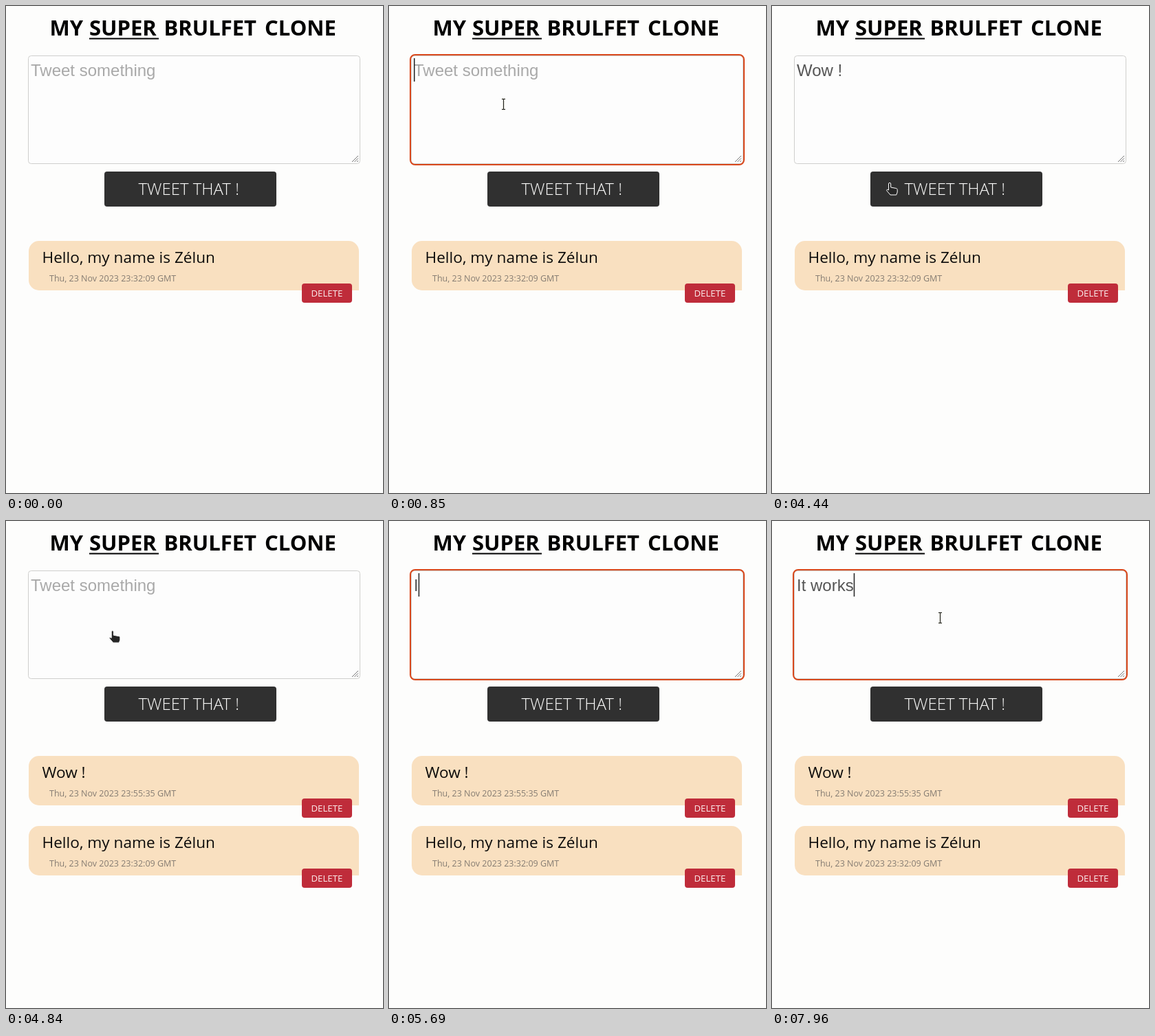
Animation, 548 px wide and 709 px high, one loop 7990 ms. Source, as an HTML page:

```html
<!DOCTYPE html>
<html lang="en">
<head>
<meta charset="utf-8">
<title>Message board</title>
<style>
  html, body { margin: 0; width: 100%; height: 100%; overflow: hidden; background: #fdfdfc; }
  svg { display: block; width: 100vw; height: 100vh; }
  text { font-family: "Open Sans", "Noto Sans", sans-serif; white-space: pre; }
  .title { font-size: 31px; font-weight: 700; }
  .post { font-size: 22.6px; fill: #0c0b0a; }
  .date { font-size: 12.5px; fill: #857c72; }
  .delete { font-size: 13.2px; fill: #fbeeee; }
  .send { font-size: 24px; font-weight: 300; fill: #fdfdfc; }
  .field { font: 24px "Liberation Sans", Arial, sans-serif; }
</style>
</head>
<body>
<svg viewBox="0 0 548 709">
  <defs>
    <g id="deleteButton">
      <rect x="430" y="404" width="73" height="28" rx="4" fill="#bf2c3a"/>
      <text class="delete" x="443.5" y="423">DELETE</text>
    </g>
  </defs>
  <rect width="548" height="709" fill="#fdfdfc"/>

  <g class="title">
    <text x="63.5" y="43">MY</text>
    <text x="121" y="43">SUPER</text>
    <text x="229.5" y="43">BRULFET</text>
    <text x="376" y="43">CLONE</text>
    <rect x="121" y="46.500" width="101" height="2"/>
  </g>

  <rect x="32.5" y="72.5" width="482" height="157" rx="4" fill="#fdfdfd" stroke="#cfcfcd"/>
  <path d="M503 227l9-9M506.500 227l5.500-5.500M510 227l2-2" stroke="#777" fill="none"/>
  <rect id="ring" x="31" y="71" width="485" height="160" rx="7" fill="none" stroke="#d9481c" stroke-width="2"/>
  <text id="input" class="field" x="36" y="102"></text>
  <rect id="caret" y="76" width="1.6" height="34" fill="#2e2e2e"/>

  <rect x="143" y="241" width="250" height="51" rx="4" fill="#303030"/>
  <text class="send" x="192.500" y="275">TWEET THAT !</text>

  <g id="posts"></g>

  <g id="arrow" stroke="#fff" fill="#111"><path d="M0 0V16L4 12.500L7 18.500L9.500 17.500L7 11.500H12Z"/></g>
  <g id="beam" fill="none">
    <path d="M-2.500-7.500h5M0-7.500v15M-2.500 7.500h5" stroke="#e6e6dc" stroke-width="3"/>
    <path d="M-2.500-7.500h5M0-7.500v15M-2.500 7.500h5" stroke="#222"/>
  </g>
  <g id="hand" stroke="#fff" fill="#262626" stroke-linejoin="round">
    <path d="M-1.500 11V2a1.600 1.600 0 0 1 3.200 0V7l8 1.500q1.500 .5 1.500 2V14l-1.500 4H1L-4.500 11.500q.5-2.500 3-.5z"/>
  </g>
</svg>
<script>
const LOOP = 7990;
const $ = id => document.getElementById(id);
const show = (id, on) => $(id).setAttribute('visibility', on ? 'visible' : 'hidden');

const typing = [
  [0, ''], [1850, 'W'], [1980, 'Wo'], [2100, 'Wow'], [2200, 'Wow '], [2350, 'Wow !'], [2500, 'Wow ! '],
  [4600, ''], [5690, 'I'], [5940, 'It'], [6060, 'It '], [6210, 'It w'], [6320, 'It wo'],
  [6430, 'It wor'], [6550, 'It work'], [6660, 'It works']
];

// Pointer paths: [time, x, y]
const path = [
  [170, 188, 645], [400, 176, 514], [800, 166.500, 143],
  [3970, 166.500, 143], [4340, 171, 257], [4600, 171, 257],
  [4940, 150.500, 134], [5140, 238, 140], [7820, 238, 140], [7960, 244.500, 141]
];

const pen = document.createElement('canvas').getContext('2d');
pen.font = '24px "Liberation Sans", Arial, sans-serif';

const within = (t, ...spans) => spans.some(([a, b]) => t >= a && t < b);
const smooth = k => k * k * (3 - 2 * k);

function pointerAt(t) {
  const i = path.findIndex(p => p[0] > t);
  if (i < 0) return path[path.length - 1].slice(1);
  if (i === 0) return path[0].slice(1);
  const [t0, x0, y0] = path[i - 1], [t1, x1, y1] = path[i];
  const k = smooth((t - t0) / (t1 - t0));
  return [x0 + (x1 - x0) * k, y0 + (y1 - y0) * k];
}

function pointerKind(t, x, y) {
  if (!within(t, [170, 1850], [3970, 5690], [7820, LOOP])) return '';
  if (within(t, [4600, 4975])) return 'hand';
  if (x > 33 && x < 514 && y > 72 && y < 229) return 'beam';
  if (x > 143 && x < 393 && y > 241 && y < 292) return 'hand';
  return 'arrow';
}

function card(message, time, dy) {
  return `<g transform="translate(0 ${dy})">
    <path d="M48 342H498a15 15 0 0 1 15 15V414H48a15 15 0 0 1-15-15V357a15 15 0 0 1 15-15z" fill="#f9e0c0"/>
    <text class="post" x="52.5" y="374">${message}</text>
    <text class="date" x="63" y="401">Thu, 23 Nov 2023 ${time} GMT</text>
    <use href="#deleteButton"/>
  </g>`;
}

let posted = null;
function drawPosts(now) {
  if (now === posted) return;
  posted = now;
  const hello = card('Hello, my name is Zélun', '23:32:09', now ? 102 : 0);
  $('posts').innerHTML = now ? card('Wow !', '23:55:35', 0) + hello : hello;
}

function render(t) {
  const value = typing.filter(k => k[0] <= t).pop()[1];
  const focused = within(t, [810, 4400], [5140, LOOP]);
  const input = $('input');
  input.textContent = value || 'Tweet something';
  input.setAttribute('fill', value ? '#555' : '#a9a9a9');

  show('ring', focused);
  show('caret', focused && !within(t, [3270, 3970], [7390, 7820]));
  $('caret').setAttribute('x', 36 + pen.measureText(value).width);

  drawPosts(t >= 4600);

  const [x, y] = pointerAt(t), kind = pointerKind(t, x, y);
  for (const id of ['arrow', 'beam', 'hand']) {
    show(id, id === kind);
    $(id).setAttribute('transform', `translate(${x} ${y})`);
  }
}

const start = performance.now();
function tick() {
  render((performance.now() - start) % LOOP);
  requestAnimationFrame(tick);
}
tick();
</script>
</body>
</html>
```
